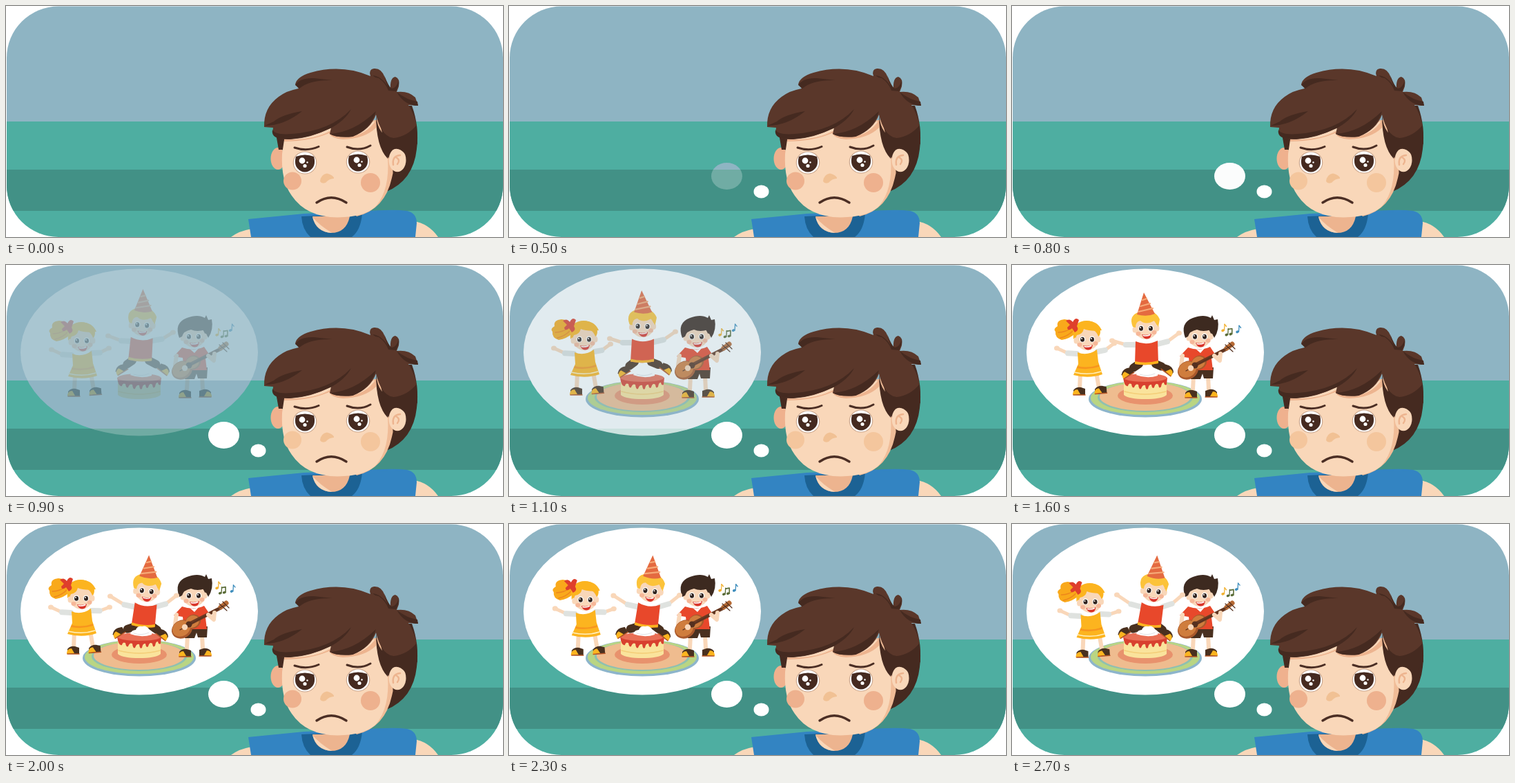
These frames come from a looping animation (720 by 336 pixels, 2800 ms). An HTML page with a canvas:

```html
<!DOCTYPE html>
<html lang="en">
<head>
<meta charset="utf-8">
<title>Daydream</title>
<style>
html, body { margin: 0; width: 100%; height: 100%; overflow: hidden; background: #fff; }
canvas { display: block; width: 720px; height: 336px; }
</style>
</head>
<body>
<canvas id="stage" width="720" height="336"></canvas>
<script>
const LOOP = 2800, STEP = 100, FADE = 410;
const SKY = '#8eb4c3', TEAL = '#4eaea1', BAND = '#429186';
const SKIN = '#f9d7b9', SHADE = '#edb48f', HAIR = '#5a372a', DARK = '#452a20';
const RED = '#e8482b', GOLD = '#fcb41f', BROWN = '#49301f', SLEEVE = '#dfe2df';

const main = document.getElementById('stage').getContext('2d');
const layer = document.createElement('canvas');
layer.width = 720;
layer.height = 336;
const party = layer.getContext('2d');
let g = main;

function shape(color, d) {
  g.fillStyle = color;
  g.fill(new Path2D(d));
}
function line(color, width, d) {
  g.strokeStyle = color;
  g.lineWidth = width;
  g.lineCap = g.lineJoin = 'round';
  g.stroke(new Path2D(d));
}
function oval(color, x, y, rx, ry = rx, turn = 0) {
  g.fillStyle = color;
  g.beginPath();
  g.ellipse(x, y, rx, ry, turn, 0, Math.PI * 2);
  g.fill();
}
function box(color, x, y, w, h) {
  g.fillStyle = color;
  g.fillRect(x, y, w, h);
}
function group(x, y, turn, draw) {
  g.save();
  g.translate(x, y);
  g.rotate(turn);
  draw();
  g.restore();
}

// Eased value at time t through the five key moments.
const KEYS = [900, 1100, 1600, 2000, 2700];
function pose(t, ...v) {
  if (t <= KEYS[0]) return v[0];
  const i = KEYS.findIndex(k => t <= k);
  if (i < 0) return v[4];
  const u = (t - KEYS[i - 1]) / (KEYS[i] - KEYS[i - 1]);
  return v[i - 1] + (v[i] - v[i - 1]) * u * u * (3 - 2 * u);
}

function background() {
  g.beginPath();
  g.roundRect(1, 0.5, 719, 335.5, 75);
  g.clip();
  box(SKY, 0, 0, 720, 168);
  box(TEAL, 0, 168, 720, 168);
  box(BAND, 0, 238, 720, 60);
}

function eye(x, y, hx) {
  oval('#c9a58c', x, y, 17.3, 16.6);
  oval('#fff', x, y, 16.2, 15.5);
  shape(DARK, `M${x - 13} ${y - 9}Q${x} ${y - 14} ${x + 13} ${y - 9}Q${x + 17} ${y + 6} ${x + 6} ${y + 12}Q${x} ${y + 15} ${x - 6} ${y + 12}Q${x - 17} ${y + 6} ${x - 13} ${y - 9}Z`);
  oval('#fff', x + hx, y - 3, 4.4);
  oval('#fff', x + hx + 4, y + 4.5, 2.6);
  oval('#fff', x + hx + 7.5, y - 0.5, 1.2);
}

function sadBoy(blush) {
  // arms and shirt
  shape(SKIN, 'M326 336Q338 327 356 324V336ZM590 313Q612 316 626 336H590Z');
  shape('#3384c2', 'M351 310L432 302L515 299Q560 295 581 298Q595 301 595 316L593 336H355Z');
  shape('#1c6294', 'M428 306L516 302Q514 326 501 336H441Q429 325 428 306Z');
  shape(SHADE, 'M444 306H498Q493 330 471 330Q448 328 444 306Z');
  shape(SKIN, 'M444 307Q454 319 472 330Q450 329 444 307Z');

  // back hair, ears, face
  shape(DARK, 'M536 145L588 145Q599 175 595 208Q590 254 551 270Z');
  oval('#efb18e', 394, 222, 10.5, 16);
  shape(DARK, 'M391 186H408L402 209H395Z');
  shape('#f0bc97', 'M402 190L540 165L554 220Q564 235 559 250Q549 296 508 306Z');
  shape(SKIN, 'M404 188L534 168Q542 200 553 222Q556 266 537 290Q522 307 480 307.500Q435 307 414 276Q398 254 400 215Z');
  oval(SKIN, 567, 224, 12.5, 17.2);
  line('#edb48f', 2.5, 'M561 231Q559 218 571 217M565 220Q572 224 567 230');
  shape(SHADE, 'M403 194Q445 196 471 181Q474 192 495 190Q522 188 536 166V177Q520 193 488 194Q472 193 468 185Q440 197 403 197Z');

  // hair
  shape(HAIR, 'M374 176Q373 148 395 132Q407 123 424 120L419 114Q421 103 441 97Q486 84 528 102Q525 92 533 91Q544 90 549 104L557 121Q556 104 564 103Q571 105 569 117L566 125Q583 123 593 133L597 145L583 144Q592 158 595 175Q578 195 560 192Q543 188 536 158Q528 180 502 190Q478 192 469 186L471 177Q443 192 412 194Q383 195 387 177Z');
  shape(DARK, 'M375 174Q403 174 429 153Q399 158 388 168ZM386 180Q390 188 414 186Q470 182 500 150Q492 166 470 178Q430 196 398 193Q384 191 386 180ZM469 186Q504 184 536 153Q528 180 502 190Q480 192 469 186ZM419 115Q426 104 446 105L473 108Q440 107 425 120Z');
  shape(DARK, 'M527 94Q528 103 540 105Q550 112 554 123L565 124Q570 114 569 108Q566 119 559 120Q554 118 548 101Q551 115 556 121Q544 101 530 101ZM566 125Q581 137 596 139L597 145Q577 145 566 125ZM536 158Q539 191 562 192Q581 190 595 173L596 200Q587 218 578 215Q567 202 556 212L553 222Q536 205 536 158Z');

  // features
  eye(433, 228, -4);
  eye(510, 227, -2);
  line('#4b2e24', 3, 'M418 206Q436 212 453 204.500M494 205Q512 212 528 203');
  shape('#f1c194', 'M455 255Q456 245 465 243.500Q475 246 475 251Q468 251 463 257Q457 259 455 255Z');
  oval(blush, 415, 254.500, 13);
  oval(blush, 528, 257, 14);
  line('#4b2e24', 3.4, 'M450 286Q471 271.500 493 286');
}

function head(x, y) {
  oval(SKIN, x - 16, y + 2, 3.5, 4.5);
  oval(SKIN, x + 16, y, 3.5, 4.5);
  oval(SKIN, x, y, 16.500, 16);
  oval('#f6b798', x - 11, y + 8, 3.500, 3);
  oval('#f6b798', x + 12, y + 6, 3.500, 3);
  for (const dx of [-7, 7]) {
    oval('#fff', x + dx, y, 4.2, 4.5);
    oval('#30231e', x + dx, y + 0.3, 3, 3.5);
    oval('#fff', x + dx - 1, y - 1, 1);
  }
  shape('#d9342b', `M${x - 6} ${y + 9}Q${x + 1} ${y + 11} ${x + 8} ${y + 8}Q${x + 7} ${y + 16} ${x + 1} ${y + 15.5}Q${x - 4} ${y + 15} ${x - 6} ${y + 9}Z`);
  line('#fff', 1.4, `M${x - 4} ${y + 10.500}Q${x + 1} ${y + 12} ${x + 6} ${y + 9.500}`);
}

function arm(sx, sy, hx, hy) {
  const ex = sx + (hx - sx) * 0.45, ey = sy + (hy - sy) * 0.35 + 2;
  line(SKIN, 5, `M${sx} ${sy}L${ex} ${ey}L${hx} ${hy}`);
  line(SLEEVE, 8, `M${sx} ${sy}L${ex} ${ey}`);
  oval(SKIN, hx, hy, 4, 3.6);
}

function shoe(x, y, turn, dir = 1) {
  group(x, y, turn, () => {
    g.scale(dir, 1);
    shape(BROWN, 'M-8 6L-8 -1Q-4 -6 3 -5L9 -3V6Z');
    shape(GOLD, 'M-9 6Q-9 -2 -2 -2L2 5Z');
    line('#b95727', 1.5, 'M-8 6H9');
  });
}

function girl(t) {
  const dx = pose(t, 1, 0, 0, 0, 4.5), dy = pose(t, 2, 0, 0, 0, 5);
  group(dx, dy, 0, () => {
    line(SKIN, 6, 'M99 157L98 180M122 156L126 179');
    shoe(97, 183, 0);
    shoe(128, 181, -0.08);
    arm(94, 129, 65, 121);
    arm(124, 126, pose(t, 148, 147, 148, 150, 150), pose(t, 119, 115, 114, 121, 122));
    shape(GOLD, 'M95 127Q109 133 123 123L125 141L131 159Q111 166 89 160L96 144Z');
    shape('#f7951e', 'M95 147Q110 151 126 145V148Q110 153 94 150Z');
    line('#fff0bf', 1.5, 'M90 156Q111 161 129 155');
    shape('#f9a91b', 'M91 100Q84 107 72 109Q62 106 63 97Q59 93 66 89Q64 80 76 79Q86 79 94 89Z');
    line('#ed861c', 1.5, 'M67 98Q78 98 89 90M70 106Q80 104 88 96');
    oval(GOLD, 108, 97, 20, 16);
    head(109, 108);
    shape(GOLD, 'M89 108Q87 88 103 82Q123 79 130 95Q114 97 104 93Q102 101 94 102Z');
    shape('#df3f2c', 'M84 87L78 81Q84 77 88 83Q92 75 97 80L94 89Q98 95 91 98L87 92Q81 97 80 91Z');
  });
}

function partyBoy(t) {
  const turn = pose(t, 0.08, 0.03, 0, 0.12, 0.15);
  const dx = pose(t, -1, -2, 0, 3.5, 3.5), dy = pose(t, -5, -3, 0, 5, 5);
  const sx = dx + turn * 30;
  const feet = [
    [pose(t, 166, 165, 166, 162, 161), pose(t, 151, 154, 156, 157, 157), 184, -0.55, 1],
    [pose(t, 230, 229, 227, 228, 226), pose(t, 151, 150, 152, 160, 160), 208, 0.65, -1]
  ];
  for (const [x, y, hip, tilt, dir] of feet) {
    const hx = hip + dx, hy = 144 + dy;
    line(SKIN, 6, `M${hx} ${hy}L${x} ${y}`);
    line(BROWN, 12, `M${hx} ${hy}L${hx + (x - hx) * 0.45} ${hy + (y - hy) * 0.45}`);
    shoe(x, y, tilt, dir);
  }
  arm(181 + sx, 116 + dy, pose(t, 148, 146, 145, 151, 152), pose(t, 103, 107, 110, 105, 103));
  arm(211 + sx, 115 + dy, pose(t, 242, 241, 242, 247, 247), pose(t, 98, 97, 99, 104, 103));
  group(195 + dx, 145 + dy, turn, () => {
    shape(RED, 'M-16 -34Q0 -27 16 -35L17 -2Q0 2 -17 -1Z');
    shape(GOLD, 'M-17 -5Q0 -1 17 -6V-2Q0 2 -17 -1Z');
    oval(GOLD, -2, -64, 19, 13);
    head(-1, -53);
    shape('#fcc33a', 'M-20 -55Q-27 -72 -10 -77Q12 -82 19 -66L17 -55L11 -64Q-1 -57 -9 -64Q-16 -63 -16 -54Z');
    shape('#e46a40', 'M-4 -105L12 -74Q0 -69 -14 -73Z');
    line('#f6aa78', 2.2, 'M-6 -94L0 -96M-9 -85L5 -89M-12 -77L9 -82');
  });
}

function guitarBoy() {
  line(SKIN, 6, 'M263 162L262 181M284 162L285 181');
  shoe(259, 187, 0);
  shoe(289, 186, 0, -1);
  shape(BROWN, 'M260 149H292L291 165H278L276 158L273 166H259Z');
  shape(RED, 'M255 120Q272 126 287 119L295 131L289 136L291 153H258L256 135L243 133Z');
  shape('#fff', 'M265 121Q272 126 280 120L273 128Z');
  line(SKIN, 6, 'M247 132L245 146L260 151');
  oval('#a9592c', 255, 153, 15.5, 13, -0.5);
  oval('#a9592c', 271, 142, 11.500, 10, -0.5);
  oval('#cf7d3d', 254, 152, 13.5, 11, -0.5);
  oval('#cf7d3d', 270, 142, 10, 8.500, -0.5);
  line('#6a3a22', 5, 'M268 144L311 122');
  oval('#54301f', 265, 146, 4.5);
  line('#b66a35', 7, 'M311 121L319 115');
  line('#54301f', 1.2, 'M309 116L320 126M314 113L323 122M252 154L317 118');
  line(SKIN, 6, 'M293 132L301 139L302 129');
  oval(SKIN, 259, 150, 4.2);
  oval('#3d2a20', 272, 95, 22, 18);
  head(272, 104);
  shape('#3d2a20', 'M251 106Q243 84 262 77Q278 71 288 77L290 73L293 80L298 79Q301 94 293 106L288 94Q277 98 268 94Q257 96 255 104Z');
}

function note(color, x, y, double) {
  oval(color, x, y + 5, 2.3, 1.8, -0.4);
  line(color, 1.3, `M${x + 2} ${y + 5}L${x + 2.5} ${y - 4}`);
  if (double) {
    oval(color, x + 6, y + 4, 2.3, 1.8, -0.4);
    line(color, 1.6, `M${x + 2.5} ${y - 3}L${x + 8} ${y - 4}V${y + 4}`);
  } else {
    line(color, 1.4, `M${x + 2.5} ${y - 4}L${x + 5} ${y - 1}`);
  }
}

function notes(t) {
  const s = Math.cos((t - 1000) / 1800 * Math.PI * 2);
  note('#f2b233', 305.5, 92.500 + 4.5 * s);
  note('#596b36', 311.5 + 1.5 * s, 97.500 + 2 * s, true);
  note('#3f8ebd', 326 - s, 91.500 - 1.5 * s);
}

function rug() {
  oval('#8db5cb', 193, 195, 82, 26.5);
  oval('#b9d583', 193, 193.500, 79, 24.5);
  oval('#8fc0b0', 193, 192.500, 69, 21.5);
  oval('#efbc8f', 193, 191.500, 66, 20.5);
  oval('#e8926d', 193, 190, 40, 13);
}

function cake() {
  shape('#fae39c', 'M162 164H224V189Q217 195 193 195Q169 195 162 189Z');
  line('#f4cd78', 1.5, 'M163 184Q193 192 223 184');
  shape('#d8402f', 'M161 164Q193 155 225 164L224 174Q221 176 220 171Q217 170 216 177Q213 181 212 174Q208 171 206 178Q203 181 202 174Q198 173 197 180Q194 183 193 175Q189 174 187 180Q184 182 183 174Q179 172 177 178Q174 180 173 173Q169 171 168 176Q163 178 161 164Z');
  oval('#e96f55', 193, 164, 31.5, 6);
}

function cream() {
  shape('#fff', 'M180 160Q182 154 188 154Q190 148 197 149Q204 147 206 153Q213 155 211 161Q196 166 180 160Z');
  line('#dfe2e5', 1, 'M185 159Q196 163 207 158');
}

function drawParty(t) {
  g = party;
  g.clearRect(0, 0, 720, 336);
  oval('#fff', 193, 127, 172, 121.5);
  if (t > 900) rug();
  girl(t);
  guitarBoy();
  cake();
  partyBoy(t);
  cream();
  notes(t);
  g = main;
}

// Softens the upper teal strip beneath a translucent bubble.
function haze(alpha, ...ellipse) {
  if (alpha <= 0 || alpha >= 1) return;
  g.save();
  g.beginPath();
  g.ellipse(...ellipse, 0, 0, Math.PI * 2);
  g.clip();
  box(alpha < 0.3 ? '#6b9db0' : SKY, 0, 168, 400, 70);
  g.restore();
}

function fadeIn(t, start, draw, ...ellipse) {
  const alpha = Math.max(0, Math.min(1, (t - start) / FADE));
  haze(alpha, ...ellipse);
  g.globalAlpha = alpha;
  draw(...ellipse);
  g.globalAlpha = 1;
}

function render(now) {
  const t = Math.floor(now % LOOP / STEP) * STEP;
  g = main;
  g.clearRect(0, 0, 720, 336);
  g.save();
  background();
  sadBoy(t >= 800 && t < 1900 ? '#f4c69d' : '#eeb18e');
  const puff = (...e) => oval('#fff', ...e);
  fadeIn(t, 0, puff, 365.5, 270, 11, 9.5);
  fadeIn(t, 400, puff, 315.5, 247.5, 22.5, 19.5);
  if (t > 800) {
    drawParty(t);
    fadeIn(t, 800, () => g.drawImage(layer, 0, 0), 193, 127, 172, 121.5);
  }
  g.restore();
}

const start = performance.now();
function tick() {
  render(performance.now() - start);
  requestAnimationFrame(tick);
}
tick();
</script>
</body>
</html>
```
